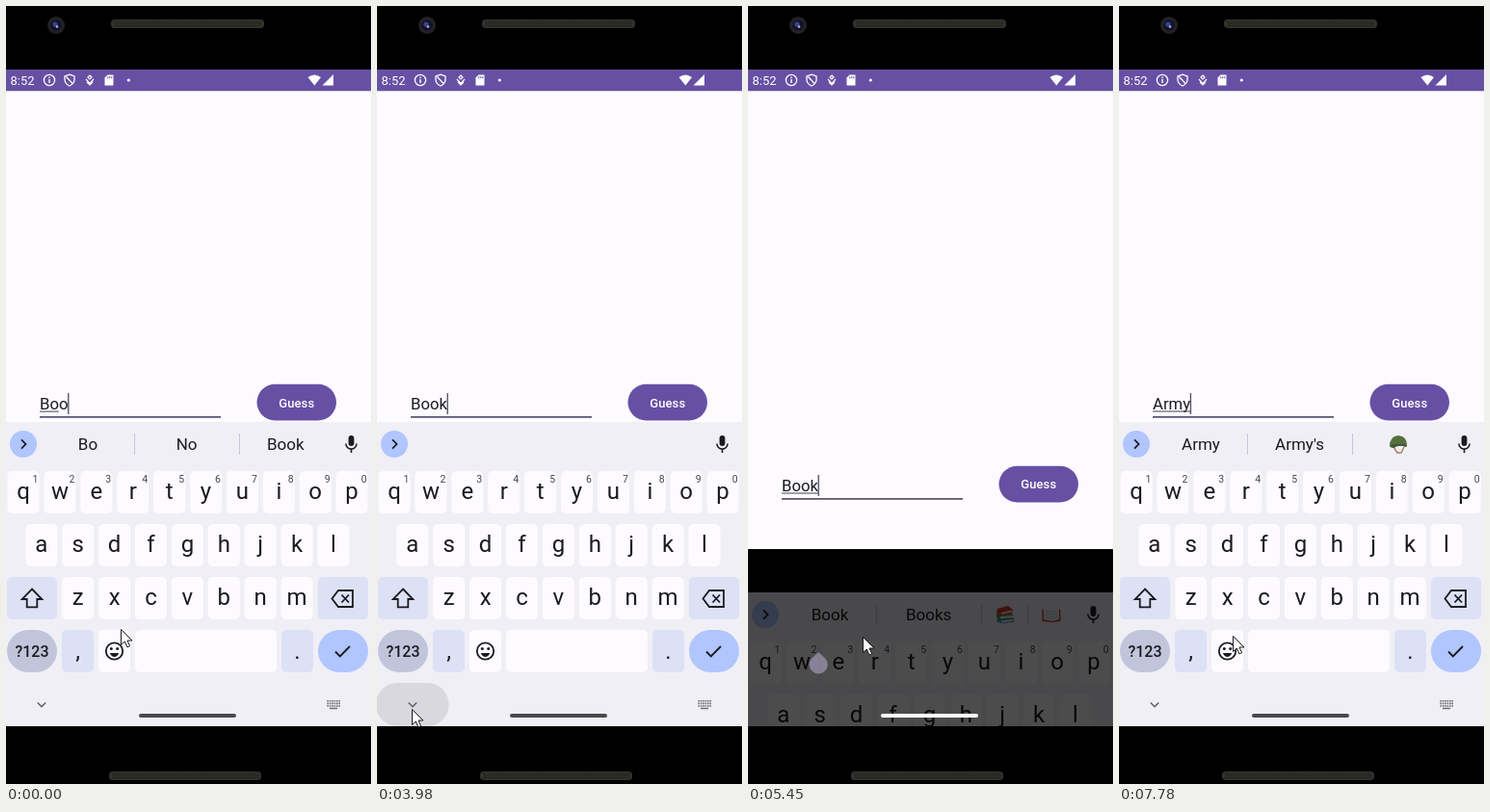
An HTML page with a canvas that plays this animation: 379 by 808 pixels, repeating every 8000 ms.

```html
<!DOCTYPE html>
<html lang="en">
<head>
<meta charset="utf-8">
<title>Word guess on a phone</title>
<style>
html, body { margin: 0; width: 100%; height: 100%; overflow: hidden; background: #000; }
canvas { display: block; width: 379px; height: 808px; }
</style>
</head>
<body>
<canvas id="stage"></canvas>
<script>
const W = 379, H = 808, LOOP = 8000;
const PAN = 247, KB_TOP = 432, SCREEN_END = 748;
const INK = '#1b1b1f', PURPLE = '#6750a4', PAPER = '#fdfbff', BLUE = '#b1c5ff', TINT = '#dde1f6';
const ratio = window.devicePixelRatio || 1;
const stage = document.getElementById('stage');
const layer = document.createElement('canvas');
for (const c of [stage, layer]) { c.width = W * ratio; c.height = H * ratio; }
const main = stage.getContext('2d');
const kbCtx = layer.getContext('2d');
let g = main;

// Each entry changes part of the state from its time on.
const events = [
  [0, { text: 'Boo', lined: 2, caret: 1, words: ['Bo', 'No', 'Book'], icons: [], mouse: [119, 647],
        pan: 1, drop: 0, fade: 1, hold: 0, press: 0, handle: 0, open: 0, pill: '#49494d' }],
  [140, { lined: 3, words: ['Boo', 'Book', 'Books'] }],
  [500, { caret: 0 }],
  [750, { text: 'Book', caret: 1 }],
  [880, { lined: 4, words: ['Book', 'Books', 'Booking'] }],
  [1250, { caret: 0 }],
  [1370, { words: ['Book', 'Books'], icons: [books, openBook] }],
  [1770, { caret: 1, mouse: [216, 560] }],
  [1890, { mouse: [338, 432] }],
  [2040, { mouse: [326, 418] }],
  [2160, { mouse: [319, 412] }],
  [2400, { press: 1 }],
  [2520, { press: 0, mouse: [250, 520] }],
  [2640, { mouse: [110, 680] }],
  [2760, { mouse: [48, 723] }],
  [3240, { caret: 0, mouse: [42, 727] }],
  [3360, { mouse: [38, 729] }],
  [3480, { mouse: [37, 729] }],
  [3730, { caret: 1, mouse: [36, 730] }],
  [3980, { lined: 0, words: [], icons: [], hold: 1 }],
  [4100, { pan: .3, drop: 200, fade: .45, hold: 0, mouse: [50, 725], pill: '#474747' }],
  [4250, { pan: 0, drop: 316, mouse: [72, 711] }],
  [4370, { mouse: [98, 684], pill: '#6c6c6c' }],
  [4490, { mouse: [120, 650], pill: '#929292' }],
  [4610, { mouse: [130, 631], pill: '#b8b8b8' }],
  [4760, { caret: 0, mouse: [127, 652], pill: '#dedede' }],
  [4880, { mouse: [126, 665], pill: '#fff' }],
  [5030, { mouse: [125, 665] }],
  [5180, { mouse: [119, 655] }],
  [5450, { caret: 1, lined: 4, words: ['Book', 'Books'], icons: [books, openBook],
           pan: .656, drop: 177, fade: .3, handle: .55 }],
  [5570, { pan: .92, drop: 55, fade: .75, handle: 0 }],
  [5690, { pan: 1, drop: 9, fade: 1, handle: 1, pill: '#b0b0b2' }],
  [5810, { drop: 0, caret: 0, mouse: [118, 654], pill: '#929295' }],
  [6080, { pill: '#77777b' }],
  [6320, { text: 'Bo', lined: 2, caret: 1, handle: 0, words: ['Bo', 'No', 'Book'], icons: [], pill: '#5f5f63' }],
  [6440, { text: 'B', lined: 1, words: ['B', 'Be', 'But'], pill: '#49494d' }],
  [6580, { text: '', lined: 0, words: [], open: 1 }],
  [6880, { caret: 0 }],
  [7000, { caret: 1 }],
  [7150, { text: 'A', words: ['A', 'And', 'Are'], open: 0 }],
  [7270, { text: 'Ar', lined: 1, words: ['Are', 'Art', 'Arm'] }],
  [7390, { text: 'Arm', lined: 2, words: ['Arm', 'Army', 'Arms'] }],
  [7530, { text: 'Army', lined: 3 }],
  [7780, { lined: 4, words: ['Army', "Army's"], icons: [helmet] }]
];

function stateAt(t) {
  const s = {};
  for (const [start, change] of events) if (start <= t) Object.assign(s, change);
  return s;
}

function box(x, y, w, h, fill, r = 0) {
  g.fillStyle = fill;
  g.beginPath();
  g.roundRect(x, y, w, h, r);
  g.fill();
}
function disc(x, y, r, fill) {
  g.fillStyle = fill;
  g.beginPath();
  g.arc(x, y, r, 0, Math.PI * 2);
  g.fill();
}
function ring(x, y, r, color, width, from = 0, to = Math.PI * 2) {
  g.strokeStyle = color;
  g.lineWidth = width;
  g.beginPath();
  g.arc(x, y, r, from, to);
  g.stroke();
}
function shape(d, fill, stroke, width = 1) {
  const p = new Path2D(d);
  if (fill) { g.fillStyle = fill; g.fill(p); }
  if (stroke) { g.strokeStyle = stroke; g.lineWidth = width; g.stroke(p); }
}
function label(s, x, y, size, color = INK, align = 'center', weight = 400) {
  g.font = `${weight} ${size}px Roboto, sans-serif`;
  g.textAlign = align;
  g.fillStyle = color;
  g.fillText(s, x, y);
}
function at(x, y, draw) {
  g.save();
  g.translate(x, y);
  draw();
  g.restore();
}

function books() {
  shape('M-8 4L7 2L9 4V8L-5 9L-9 7Z', '#3f8fc0');
  shape('M-4 6.5L8 5V7L-4 8.3Z', '#e8edf0');
  shape('M-9 -1L5 -2L8 0V4L-5 5L-9 3Z', '#4d9b4b');
  shape('M-5 2L8 1V3L-5 4.2Z', '#e6eee4');
  shape('M-8 -6L3 -9L8 -5L7 -1L-4 1L-9 -2Z', '#d8372f');
  shape('M-4 -2L7 -4.5V-2.5L-4 0Z', '#f3e7e2');
}
function openBook() {
  shape('M-9.5 -5L-8 -6V5L0 7L8 5V-6L9.5 -5V7L1 8H-1L-9.5 7Z', '#c8493d');
  shape('M-8 -6Q-3 -8 0 -5V6Q-4 3.5 -8 5ZM8 -6Q3 -8 0 -5V6Q4 3.5 8 5Z', '#eceff1');
  shape('M0 -5V6M-6 -3H-2M-6 0H-2M-6 3H-2M2 -3H6M2 0H6M2 3H6', null, '#a4b0b8', .8);
}
function helmet() {
  shape('M-5 3L-1 9H3L6 3', null, '#a77b58', 1.4);
  shape('M-9 2Q-9 -8 0 -9Q9 -8 9 1L8 3Q1 0 -5 4Q-8 4 -9 2Z', '#55703e');
  shape('M-9 2Q-3 -2 9 1L8 3Q1 0 -5 4Z', '#3f5630');
}

function mesh(x, y, w, h) {
  box(x, y, w, h, '#33332f', 4);
  g.fillStyle = '#10100f';
  for (let row = 0; row < 3; row++)
    for (let i = 3 + row % 2; i < w - 3; i += 2.6) g.fillRect(x + i, y + 1.7 + row * 2.2, 1.2, 1.2);
}

function drawDevice() {
  box(0, 0, W, 66, '#000');
  disc(52, 20, 9, '#222224');
  disc(52, 20, 5.6, '#10122c');
  disc(51, 19, 2.6, '#3d4288');
  disc(53, 21.5, 1.3, '#a9b4e8');
  mesh(109, 14, 159, 9);
  box(0, SCREEN_END, W, H - SCREEN_END, '#000');
  mesh(107, 795, 158, 9);
}

function drawStatus() {
  const white = '#fff';
  box(0, 66, W, 22.3, PURPLE);
  label('8:52', 4.5, 82, 13, white, 'left');
  ring(45, 77, 5.6, white, 1.3);
  box(44.3, 76, 1.4, 4, white);
  box(44.3, 73.6, 1.4, 1.4, white);
  shape('M66 71.2L71 73V77Q70.5 81 66 83Q61.5 81 61 77V73ZM62.5 73.5L69.5 81', null, white, 1.3);
  shape('M87 72L89 74L87 76L85 74ZM83 76L87 80.5L91 76M84 79L87 82L90 79', null, white, 1.2);
  shape('M105.5 71.5H111.5V82.5H102.5V74.5Z', white);
  shape('M105.8 73V75.4M107.8 73V75.4M109.8 73V75.4', null, PURPLE, .9);
  disc(127.3, 77, 1.6, white);
  shape('M313.5 74Q320.3 68.8 327 74L320.3 82.6Z', white);
  shape('M328.5 82.5L340 71V82.5Z', white);
}

function drawContent(s) {
  const up = PAN * s.pan;
  g.save();
  g.beginPath();
  g.rect(0, 88, W, SCREEN_END - 88);
  g.clip();
  box(0, 88, W, 638 - up, PAPER);
  g.translate(0, -up);
  const grey = '#49454f';
  label('Guess #1', 27, 102.7, 13, grey, 'left');
  label('Guess #1 Check', 27, 118, 13, grey, 'left');
  label('BOOK', 346, 102.7, 13, grey, 'left');
  label('XXXX', 346, 118, 13, grey, 'left');

  label(s.text, 35, 666.4, 16.7, '#1c1b1f', 'left');
  const width = n => g.measureText(s.text.slice(0, n)).width;
  if (s.lined) box(35, 667.6, width(s.lined), 1, '#45434a');
  if (s.caret) box(34.7 + width(s.text.length), 649, 1.3, 22, '#4f4a63');
  box(35, 673, 188, 1.7, '#5b5470');

  box(260.5, 639.8, 82.5, 37.7, s.press ? '#7c68b0' : PURPLE, 18.85);
  g.letterSpacing = '0.1px';
  label('Guess', 301.7, 663.5, 13, '#fff', 'center', 500);
  g.letterSpacing = '0px';
  g.restore();
}

function key(x, row, w = 33, fill = PAPER, r = 5) {
  box(x, 483 + row * 55, w, 44, fill, r);
}

function drawStrip(s) {
  disc(18, 455, 14, BLUE);
  shape(s.open ? 'M20 450.3L15.5 455L20 459.7' : 'M16 450.3L20.5 455L16 459.7', null, INK, 1.8);
  const line = x => box(x, 444, 1, 22, '#c3c9dc');
  if (s.words.length) { line(133); line(242); }
  s.words.forEach((word, i) => label(word, 85 + i * 102.6, 461, 17));
  if (s.icons.length === 2) {
    line(290);
    at(267, 455, s.icons[0]);
    at(315, 455, s.icons[1]);
  } else if (s.icons.length) at(290, 455, s.icons[0]);

  box(355.6, 446, 5.8, 11, INK, 2.9);
  ring(358.5, 454.5, 5.6, INK, 1.5, 0, Math.PI);
  box(357.7, 460, 1.6, 4, INK);
}

function drawKeyboard(s) {
  box(0, KB_TOP, W, SCREEN_END - KB_TOP, '#f0eff6');
  drawStrip(s);
  const rows = [['qwertyuiop', 1.5], ['asdfghjkl', 20.3], ['zxcvbnm', 58.2]];
  rows.forEach(([letters, left], row) => [...letters].forEach((ch, i) => {
    const x = left + i * 37.9;
    key(x, row);
    label(ch, x + 16.5, 512 + row * 55, 24);
    if (row === 0) label((i + 1) % 10, x + 29, 495, 10.5, '#45464f');
  }));

  key(1, 2, 52, TINT);
  shape('M27 605.5L37.3 616H32.3V624.3H21.7V616H16.7Z', null, INK, 1.8);
  key(324, 2, 52, TINT);
  shape('M345 607H360V624H345L338.5 615.5ZM348.5 611.5L356 619.5M356 611.5L348.5 619.5', null, INK, 1.8);

  key(1, 3, 52, '#c0c5dc', 22);
  label('?123', 27, 675.5, 16, INK, 'center', 500);
  key(58, 3, 33, TINT);
  label(',', 74.5, 678, 24);
  key(96, 3);
  ring(112.5, 670, 8.7, INK, 1.8);
  disc(109.3, 667.5, 1.5, INK);
  disc(115.7, 667.5, 1.5, INK);
  shape('M107.8 672H117.2Q115.5 676 112.5 676Q109.5 676 107.8 672Z', INK);
  key(134, 3, 147);
  key(286, 3, 33, TINT);
  label('.', 302.5, 678, 24);
  key(324, 3, 52, BLUE, 22);
  shape('M342 670.5L346.8 675.3L357 665', null, INK, 1.9);

  if (s.hold) box(-1, 703, 75.5, 45, '#d9d8de', 22);
  shape('M32.8 723.5L37 727.7L41.2 723.5', null, '#5c5d66', 1.5);
  for (let row = 0; row < 3; row++)
    for (let i = 0; i < 6; i++) box(333.4 + i * 2.4, 721 + row * 2.6, 1.6, 1.6, '#6a6a72');
  box(336, 728.8, 8, 1.4, '#6a6a72');
}

function drawHandle(s) {
  if (!s.handle) return;
  const y = s.fade < 1 ? 683 : 437;
  g.globalAlpha = s.handle;
  const color = s.fade < 1 ? '#b9aed4' : '#625b74';
  shape(`M73.2 ${y - 12}L80.2 ${y - 5.5}A9.5 9.5 0 1 1 66.2 ${y - 5.5}Z`, color);
  g.globalAlpha = 1;
}

function drawPointer([x, y]) {
  at(x + .5, y + .5, () =>
    shape('M0 0V16L3.8 12.5L6.4 18.4L9.1 17.2L6.5 11.5H11.5Z', '#fff', '#1a1a1a', 1));
}

function render(t) {
  const s = stateAt(t);
  g = main;
  g.setTransform(ratio, 0, 0, ratio, 0, 0);
  box(0, 0, W, H, '#000');
  drawContent(s);
  drawStatus();
  if (s.drop < 316) {
    g = kbCtx;
    g.setTransform(ratio, 0, 0, ratio, 0, 0);
    g.clearRect(0, 0, W, H);
    drawKeyboard(s);
    g = main;
    g.globalAlpha = s.fade;
    g.drawImage(layer, 0, s.drop, W, H);
    g.globalAlpha = 1;
  }
  drawHandle(s);
  drawDevice();
  box(138, 735, 101, 4, s.pill, 2);
  drawPointer(s.mouse);
}

const began = performance.now();
function tick() {
  render((performance.now() - began) % LOOP);
  requestAnimationFrame(tick);
}
tick();
</script>
</body>
</html>
```
